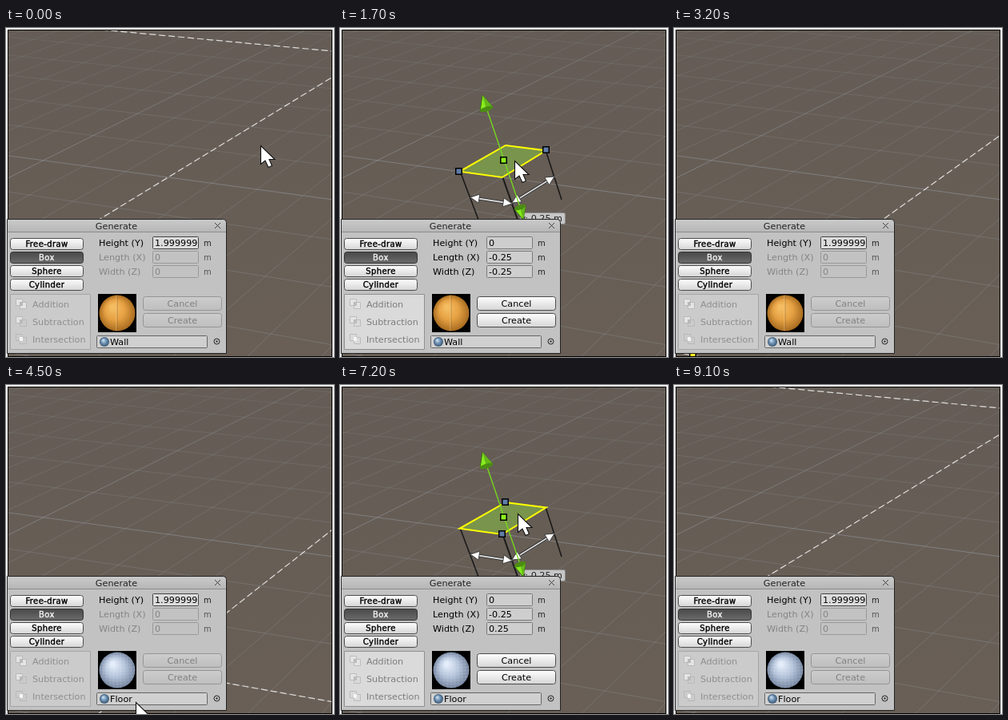
These frames come from a looping animation (410 px wide and 412 px high, 9.2 s). An HTML page with a canvas:

```html
<!DOCTYPE html>
<html lang="en">
<head>
<meta charset="utf-8">
<title>Box tool</title>
<style>
html, body { margin: 0; height: 100%; overflow: hidden; background: #fff; }
canvas { display: block; }
</style>
</head>
<body>
<canvas id="stage" width="410" height="412"></canvas>
<script>
const c = document.getElementById('stage').getContext('2d');
const LOOP = 9200, STEP = 100;

// Ground plane: origin, two vanishing points, and the size of one grid cell
const O = [207, 147], VU = [-3950, -377], VV = [1084, -352];
const CU = 0.01205, CV = 0.0616;

// Pointer path: time, x, y
const PATH = [
  [0, 318, 147], [700, 150, 179], [800, 150, 179], [1000, 205, 149],
  [1300, 255, 153], [1500, 255, 153], [1700, 218, 166], [1800, 218, 166],
  [2200, 110, 290], [2300, 110, 290], [2400, 50, 330], [2900, 50, 330],
  [3000, 40, 370], [3100, 26, 412], [3200, 26, 418], [3700, 26, 418],
  [4200, 180, 372], [4400, 180, 372], [4500, 162, 397], [4900, 420, 260],
  [5200, 420, 260], [5400, 440, 120], [5500, 440, 120], [6100, 212, 150],
  [6200, 208, 151], [6800, 208, 151], [7000, 203, 186], [7100, 203, 186],
  [7200, 222, 161], [7700, 300, 110], [7800, 300, 110], [8300, 380, 90],
  [8400, 380, 90], [8800, 453, 34]
];

// Each box: pressed, released, dismissed, start cell, handle cells
const BOXES = [
  { press: 700, release: 1600, end: 1900, start: [0, -1], handles: [[0, -1], [-1, 0]] },
  { press: 6500, release: 7200, end: 7400, start: [0, 0], handles: [[0, 0], [-1, -1]] }
];
const FLOOR_FROM = 4200;

function pointer(t) {
  const i = PATH.findIndex(k => k[0] > t);
  if (i < 0) return PATH[PATH.length - 1].slice(1);
  const [t0, x0, y0] = PATH[i - 1], [t1, x1, y1] = PATH[i];
  const k = (t - t0) / (t1 - t0);
  return [x0 + (x1 - x0) * k, y0 + (y1 - y0) * k];
}

function project(u, v) {
  const p = u * CU, q = v * CV, w = 1 + p + q;
  return [0, 1].map(i => (O[i] + p * VU[i] + q * VV[i]) / w);
}

function snap([x, y]) {
  const a = VU[0] - x, b = VV[0] - x, d = VU[1] - y, e = VV[1] - y;
  const f = x - O[0], g = y - O[1], det = a * e - b * d;
  return [Math.round((f * e - b * g) / det / CU), Math.round((a * g - f * d) / det / CV)];
}

function path(points, fill, stroke, width = 1) {
  c.beginPath();
  points.forEach(p => c.lineTo(p[0], p[1]));
  if (fill) { c.closePath(); c.fillStyle = fill; c.fill(); }
  if (stroke) { c.strokeStyle = stroke; c.lineWidth = width; c.stroke(); }
}

function frame(x, y, w, h, fill, stroke, r = 0) {
  c.beginPath();
  c.roundRect(x + 0.5, y + 0.5, w - 1, h - 1, r);
  c.fillStyle = fill; c.fill();
  c.strokeStyle = stroke; c.lineWidth = 1; c.stroke();
}

function text(s, x, y, color = '#000', size = 11.2, align = 'left') {
  c.font = `${size}px "DejaVu Sans", sans-serif`;
  c.textAlign = align;
  c.fillStyle = color;
  c.fillText(s, x, y);
}

function shade(y0, y1, top, bottom) {
  const g = c.createLinearGradient(0, y0, 0, y1);
  g.addColorStop(0, top); g.addColorStop(1, bottom);
  return g;
}

function handle([x, y], color) {
  x = Math.round(x); y = Math.round(y);
  c.fillStyle = '#000'; c.fillRect(x - 5, y - 5, 9, 9);
  c.fillStyle = color; c.fillRect(x - 3.5, y - 3.5, 6, 6);
}

// Line through a ground point, running toward a vanishing point
function groundLine([x, y], vp, color, width) {
  const slope = (vp[1] - y) / (vp[0] - x);
  path([[0, y - slope * x], [410, y + slope * (410 - x)]], null, color, width);
}

function ground() {
  c.fillStyle = shade(0, 412, '#645c55', '#695f56');
  c.fillRect(0, 0, 410, 412);
  const g = major => shade(0, 300, `rgba(145,152,158,${major ? .35 : .16})`,
                                   `rgba(145,152,158,${major ? .7 : .34})`);
  for (let i = -9; i <= 12; i++) groundLine(project(i, 0), VV, g(i === 2));
  for (let i = -7; i <= 8; i++) groundLine(project(0, i), VU, g(i === -1));
}

function cross(cell) {
  const p = project(...cell);
  c.setLineDash([8, 4]);
  groundLine(p, VU, '#dedcd9', 1.2);
  groundLine(p, VV, '#dedcd9', 1.2);
  c.setLineDash([]);
}

function quad([u0, v0], [u1, v1]) {
  path([project(u0, v0), project(u1, v0), project(u1, v1), project(u0, v1),
        project(u0, v0)], 'rgba(130,175,72,.68)', '#ff0', 2);
}

function measure(a, b) {
  const n = Math.atan2(b[1] - a[1], b[0] - a[0]);
  path([a, b], null, '#222', 3.5);
  path([a, b], null, '#d8d8d8', 2);
  for (const [p, s] of [[a, 1], [b, -1]]) {
    c.save(); c.translate(...p); c.rotate(n); c.scale(s, 1);
    path([[0, 0], [11, -5.5], [11, 5.5]], '#fff', '#333', 0.8);
    c.restore();
  }
}

function cone(tip, left, right) {
  const mid = [(left[0] + right[0]) / 2, (left[1] + right[1]) / 2];
  const reach = Math.hypot(right[0] - left[0], right[1] - left[1]) / 2;
  path([tip, left, right], '#86ec1c', '#3c6a10');
  path([tip, mid, right], '#64b81a');
  c.beginPath();
  c.ellipse(...mid, reach, 3, Math.atan2(right[1] - left[1], right[0] - left[0]), 0, 7);
  c.fillStyle = '#4b8c14'; c.fill();
}

function gizmo(box) {
  path([[150, 179], [173, 240]], null, '#1a1a1a', 1.6);
  path([[203, 186], [222, 240]], null, '#1a1a1a', 2);
  path([[257, 153], [277, 215]], null, '#1a1a1a', 1.6);
  quad([0, 0], [-1, -1]);
  measure([163, 212], [215, 220]);
  measure([215, 219], [268, 186]);
  frame(225, 231, 57, 15, '#c6c6c6', '#8a8a8a', 2);
  text('y: 0.25 m', 278, 242, '#222', 11.2, 'right');
  path([[183, 100], [227, 230]], null, '#76dd1c', 1.3);
  cone([178, 84], [175, 104], [191, 99]);
  cone([229, 240], [218, 227], [232, 222]);
  box.handles.forEach(h => handle(project(...h), '#5f7ca8'));
  handle([205, 166], '#8cf01c');
}

function button(label, x, y, w, h, size, state) {
  const [top, bottom, edge, ink] = {
    on: ['#fff', '#d4d4d4', '#4c4c4c', '#000'],
    off: ['#cdcdcd', '#bebebe', '#959595', '#818181'],
    down: ['#484848', '#6c6c6c', '#333', '#f0f0f0']
  }[state];
  frame(x, y, w, h, shade(y, y + h, top, bottom), edge, 3);
  text(label, x + w / 2, y + h / 2 + size * 0.36, ink, size, 'center');
}

function toolButton(label, y, pressed) {
  c.letterSpacing = '0.4px';
  button(label, 5, y, 92, 15, 10, pressed ? 'down' : 'on');
  c.lineWidth = 0.4;
  c.strokeStyle = c.fillStyle;
  c.strokeText(label, 51, y + 11.1);
  c.letterSpacing = '0px';
}

function field(label, value, y, live, focused) {
  const ink = live ? '#000' : '#858585';
  text(label, 116, y + 12, ink);
  frame(183, y, 58, 16, focused ? '#dcdcdc' : live ? '#cecece' : '#c2c2c2',
        focused ? '#444' : live ? '#7a7a7a' : '#999', 1);
  text(value, 186, y + 12, ink);
  text('m', 247, y + 12, live ? '#222' : '#555', 10);
}

function ball(x, y, r, colors) {
  const g = c.createRadialGradient(x - r * .25, y - r * .35, r * .1, x, y, r);
  colors.forEach((k, i) => g.addColorStop(i / (colors.length - 1), k));
  c.beginPath(); c.arc(x, y, r, 0, 7);
  c.fillStyle = g; c.fill();
}

function preview(isFloor) {
  c.fillStyle = '#000'; c.fillRect(115, 333, 48, 48);
  ball(139, 357, 22.5, isFloor ? ['#e4edfa', '#b4c3da', '#74849e']
                               : ['#f5bd62', '#e6a143', '#a86c20']);
  c.save(); c.clip();
  if (isFloor) {
    for (let i = -24; i <= 24; i += 4) {
      path([[139 + i, 333], [139 + i * 1.2, 381]], null, 'rgba(235,242,255,.16)', .7);
      path([[115, 357 + i], [139, 359 + i], [163, 357 + i]], null, 'rgba(235,242,255,.16)', .7);
    }
  } else {
    path([[138, 334], [138, 381]], null, 'rgba(255,225,160,.5)');
    path([[139, 334], [139, 381]], null, 'rgba(110,65,15,.35)');
  }
  c.restore();
}

function modes(live) {
  const bg = live ? '#dadada' : '#cbcbcb', edge = live ? '#bcbcbc' : '#b9b9b9';
  frame(5, 333, 101, 70, bg, live ? '#909090' : '#a6a6a6');
  ['Addition', 'Subtraction', 'Intersection'].forEach((name, i) => {
    const y = 339 + i * 22;
    frame(12, y, 9, 9, i === 2 ? bg : '#e4e4e4', edge);
    frame(17, y + 4, 9, 9, i ? bg : '#e4e4e4', edge);
    c.fillStyle = i === 2 ? '#f4f4f4' : edge;
    c.fillRect(17, y + 4, 4, 5);
    text(name, 33, y + 11, live ? '#7c7c7c' : '#8e8e8e');
  });
}

function panel(live, done, size, isFloor) {
  c.beginPath();
  c.roundRect(1.5, 239.5, 274, 168, [0, 4, 0, 0]);
  c.fillStyle = '#c2c2c2'; c.fill();
  c.strokeStyle = '#222'; c.lineWidth = 1; c.stroke();
  c.fillStyle = shade(240, 256, '#cacaca', '#b5b5b5');
  c.fillRect(2, 241, 272, 14);
  c.fillStyle = '#8c8c8c'; c.fillRect(2, 255, 273, 1);
  text('Generate', 138, 252, '#222', 11.2, 'center');
  path([[261, 244], [268, 251]], null, '#444');
  path([[268, 244], [261, 251]], null, '#444');

  ['Free-draw', 'Box', 'Sphere', 'Cylinder'].forEach((name, i) =>
    toolButton(name, 263 + i * 17, i === 1));
  field('Height (Y)', done ? '0' : '1.999999', 261, true, !done);
  field('Length (X)', size[0], 279, live);
  field('Width (Z)', size[1], 297, live);
  modes(live);
  preview(isFloor);
  button('Cancel', 171, 336, 99, 18, 11.2, live ? 'on' : 'off');
  button('Create', 171, 357, 99, 18, 11.2, live ? 'on' : 'off');

  frame(113, 385, 139, 16, '#d0d0d0', '#666', 1);
  ball(123, 393, 6, ['#c7dbec', '#6d91b4', '#3b566f']);
  text(isFloor ? 'Floor' : 'Wall', 130, 397);
  c.beginPath(); c.arc(263.5, 392.5, 3.5, 0, 7);
  c.strokeStyle = '#222'; c.lineWidth = 1; c.stroke();
  c.fillStyle = '#222'; c.fillRect(262.5, 391.5, 2, 2);
}

function arrow([x, y]) {
  const shape = [[0, 0], [0, 23], [5.5, 18.5], [9.5, 27], [14, 25], [10.5, 17], [17.5, 17], [0, 0]];
  path(shape.map(p => [x + p[0] + .5, y + p[1] + .5]), '#fff', '#111', 1.1);
}

function draw(now) {
  const t = Math.floor(now % LOOP / STEP) * STEP;
  const box = BOXES.find(b => t >= b.press && t < b.end);
  const done = box && t >= box.release;
  // The crosshair trails the pointer by one step
  const cell = done ? box.handles[1] : snap(pointer((t - STEP + LOOP) % LOOP));
  const size = box ? [cell[0] - box.start[0], box.start[1] - cell[1]].map(n => String(n / 4))
                   : ['0', '0'];

  c.fillStyle = '#fff'; c.fillRect(0, 0, 410, 412);
  c.save();
  c.beginPath(); c.rect(2, 2, 406, 410); c.clip();
  ground();
  if (done) gizmo(box);
  else {
    cross(cell);
    if (box) {
      quad(box.start, cell);
      handle(project(...box.start), '#5f7ca8');
    }
    handle(project(...cell), '#ffee20');
  }
  c.strokeStyle = '#000'; c.lineWidth = 1;
  c.strokeRect(2.5, 2.5, 405, 409);
  c.restore();
  panel(!!box, done, size, t >= FLOOR_FROM);
  arrow(pointer(t));
}

function tick() {
  draw(performance.now());
  requestAnimationFrame(tick);
}
tick();
</script>
</body>
</html>
```
